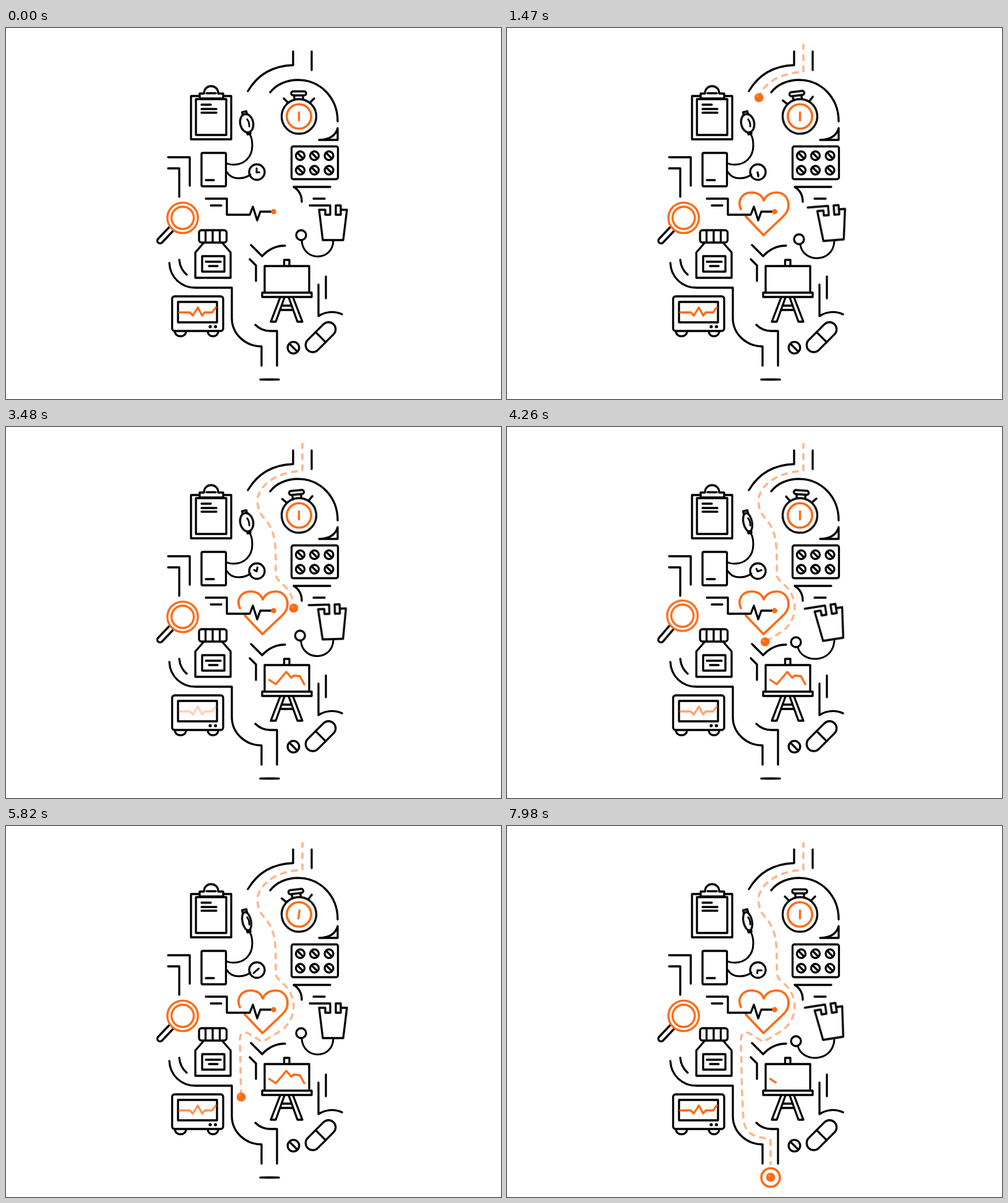
An HTML page without scripts that plays this animation: 800 px wide and 600 px high, repeating every 8000 ms.

```html
<!DOCTYPE html>
<html lang="en">
<head>
<meta charset="utf-8">
<title>Medical journey</title>
<style>
  @property --hours { syntax: "<number>"; inherits: true; initial-value: 0; }

  html, body { margin: 0; width: 100%; height: 100%; overflow: hidden; background: #fff; }
  svg {
    display: block; width: 800px; height: 600px;
    --orange: #ff6a13;
    --route: path("M479 26 V71 C450 72 416 84 407 113 C404 140 418 146 425 158 C434 172 436 190 436 217 V238 C437 250 448 252 456 264 C470 284 468 312 446 330 L418 347 L414 349 L396 338 C388 332 378 331 378 346 L380 438 L382 473 C384 494 394 500 408 503 L426 507 V568");
    fill: none; stroke: #000; stroke-width: 3.3; stroke-linecap: round; stroke-linejoin: round;
  }
  .white { fill: #fff; }
  .orange { stroke: var(--orange); }
  .dot { fill: var(--orange); stroke: none; }
  .move { animation: 8s linear infinite; }
  .ease { animation-timing-function: ease-in-out; }

  /* ball and the dashed trail behind it share one timeline */
  .route { d: var(--route); }
  .trail { stroke: #ffb68c; stroke-width: 3.6; stroke-dasharray: 8 10; }
  .reveal { stroke: #fff; stroke-width: 14; stroke-linecap: butt; stroke-dasharray: 100 200; animation-name: travel; }
  .ball { offset-path: var(--route); offset-rotate: 0deg; animation-name: travel, appear; }
  @keyframes travel {
    0%, 1.1% { offset-distance: 0%; stroke-dashoffset: 100; }
    18.375% { offset-distance: 18.8%; stroke-dashoffset: 81.2; }
    32.625% { offset-distance: 34.5%; stroke-dashoffset: 65.5; }
    53.25% { offset-distance: 57.4%; stroke-dashoffset: 42.6; }
    72.75% { offset-distance: 77.75%; stroke-dashoffset: 22.25; }
    87.75% { offset-distance: 93.94%; stroke-dashoffset: 6.06; }
    93.25%, 100% { offset-distance: 100%; stroke-dashoffset: 0; }
  }
  @keyframes appear { 0%, 1% { opacity: 0; } 1.5%, 100% { opacity: 1; } }

  .draw { stroke-dasharray: 100 200; stroke-dashoffset: 101; }
  .heart { animation-name: heart; }
  @keyframes heart {
    0%, 1.2% { stroke-dashoffset: 101; opacity: 0; }
    1.3% { stroke-dashoffset: 100; opacity: 1; }
    15%, 100% { stroke-dashoffset: 0; opacity: 1; }
  }
  .chart { animation-name: chart; }
  @keyframes chart {
    0%, 25% { stroke-dashoffset: 100; opacity: 0; }
    25.1% { stroke-dashoffset: 100; opacity: 1; }
    32.625% { stroke-dashoffset: 38; }
    37.5%, 91.5% { stroke-dashoffset: 0; }
    99.75%, 100% { stroke-dashoffset: 87; opacity: 1; }
  }

  .signal { animation-name: blink; }
  @keyframes blink {
    0%, 10.5%, 18.4%, 30.4%, 40.9%, 48.75%, 60.75%, 71.25%, 79.1%, 91.1%, 100% { opacity: 1; }
    14.4%, 44.8%, 75.2% { opacity: .1; }
    22.9%, 53.25%, 83.6% { opacity: .62; }
    27%, 57.4%, 87.75% { opacity: .22; }
  }

  .lens { transform-origin: 248px 346px; animation-name: search; }
  @keyframes search {
    0%, 18.4%, 40.6%, 51%, 70.9%, 81.3%, 91.2%, 100% { transform: rotate(0); }
    6.25%, 32.6%, 56.25%, 84.4% { transform: rotate(-7.5deg); }
    12.5%, 25%, 63%, 87.75% { transform: rotate(3.7deg); }
  }

  .watch, .hand { transform-origin: 473px 143px; }
  .watch { animation-name: shake; }
  @keyframes shake {
    0%, 32.6%, 91.2%, 100% { transform: rotate(0); }
    6%, 18.4%, 40%, 61%, 72.75% { transform: rotate(-7deg); }
    12%, 25%, 53.25%, 66%, 80% { transform: rotate(4deg); }
    87.75% { transform: rotate(-9deg); }
  }
  .hand { animation-name: tick; }
  @keyframes tick {
    0%, 18.4%, 32.6%, 53.25%, 91.2%, 100% { transform: rotate(0); }
    72.75% { transform: rotate(8deg); }
    87.75% { transform: rotate(-7deg); }
  }

  .bulb { transform-origin: 0 0; vector-effect: non-scaling-stroke; animation-name: squeeze; }
  @keyframes squeeze {
    0%, 9%, 18.4%, 43%, 63%, 87.75% { transform: scaleX(1); }
    4.5%, 13.5%, 32.6%, 53.25%, 72.75%, 99.75%, 100% { transform: scaleX(.66); }
  }

  .clock { animation-name: hours; }
  .clock path { transform-origin: 405px 233.5px; }
  .minute { transform: rotate(calc(var(--hours) * 360deg)); }
  .hour { transform: rotate(calc(90deg + var(--hours) * 30deg)); }
  @keyframes hours {
    0% { --hours: 0; }
    18.375% { --hours: 2.47; }
    32.625% { --hours: 5.73; }
    53.25% { --hours: 8.2; }
    72.75% { --hours: 10.63; }
    87.75% { --hours: 12; }
    99.75%, 100% { --hours: 15.25; }
  }

  .scope { transform-origin: 530px 352px; animation-name: tilt; }
  .bell { animation-name: swing; }
  .tube { animation-name: bend; }
  @keyframes tilt {
    0%, 23.1%, 40.6%, 68.75%, 90%, 100% { transform: rotate(0); }
    10.1%, 13.75%, 50.6%, 60%, 99.75% { transform: rotate(-9deg); }
  }
  @keyframes swing {
    0%, 23.1%, 40.6%, 68.75%, 90%, 100% { transform: translate(0, 0); }
    10.1%, 13.75%, 50.6%, 60%, 99.75% { transform: translate(-10px, 13px); }
  }
  @keyframes bend {
    0%, 23.1%, 40.6%, 68.75%, 90%, 100% { d: path("M478 344 C480 378 528 378 529 344"); }
    10.1%, 13.75%, 50.6%, 60%, 99.75% { d: path("M470 356 C476 382 526 384 529 346"); }
  }

  .goal { ry: .1px; stroke-width: 3.6; animation-name: open; }
  @keyframes open {
    0%, 80.3% { ry: .1px; stroke: #000; }
    85.5% { ry: 15px; stroke: #f9a070; }
    87.75% { ry: 15px; stroke: #fb9558; }
    93.5%, 100% { ry: 15px; stroke: #ff6a13; }
  }
</style>
</head>
<body>
<svg viewBox="0 0 800 600">
  <defs>
    <mask id="reveal" maskUnits="userSpaceOnUse" x="0" y="0" width="800" height="548">
      <path class="route reveal move" pathLength="100"/>
    </mask>
    <g id="pill"><circle r="7"/><path d="M-4.5 -4.5 L4.5 4.5"/></g>
    <g id="row"><use href="#pill" x="475.5"/><use href="#pill" x="498.5"/><use href="#pill" x="522"/></g>
  </defs>

  <!-- tunnel walls -->
  <path d="M464 38 V60 C431 61 407 75 391 102 M494 38 V68
    M427 104 C437 91 454 84 472 84 C508 84 536 113 536 151
    M506 181 H536 V162 C533 174 522 181 506 181
    M262 209 H297 V255 M262 227 H280 V273
    M465 257 H524 M465 257 C473 262 478 270 478 281 M497 276 H515
    M396 351 L414 369 C424 358 436 352 451 352 M394 374 L404 384 V409
    M264 380 C265 403 283 420 306 420 H365 V469 C365 495 387 515 413 515 V546
    M280 375 C281 385 285 393 292 399
    M403 480 C410 487 418 490 427 490 H438 V546
    M517 402 V437 M505 415 V466 C515 459 530 457 543 463"/>

  <!-- clipboard -->
  <path d="M299 110 H364 V180 H299 Z M307 115 H356 V173 H307 Z"/>
  <path class="white" d="M313 114 V106 H320 C320 90 343 90 343 106 H351 V114 Z"/>
  <path d="M324 105.5 H339 M316 124 H331 M316 131 H340 M316 137 H340"/>

  <!-- blood pressure meter -->
  <rect x="316" y="202" width="39.5" height="54" rx="2"/>
  <path d="M323 246 H336"/>
  <path stroke-width="3" d="M394 172 C398 178 398 184 398 190 C398 210 384 221 368 221 C362 221 359 220 357 219
    M357 233 C361 240 367 243 376 243 C384 243 390 241 395 237"/>
  <g transform="translate(389 154) rotate(-12)">
    <path class="white" d="M-3.5 -19 H3.5 V-13 H-3.5 Z M-2.5 14 H2.5 V18 H-2.5 Z"/>
    <ellipse class="white bulb move ease" rx="10.5" ry="15"/>
    <path stroke-width="2.8" d="M2 -6 C4 -2 4 2 3 6"/>
  </g>
  <circle cx="405.5" cy="233" r="12.5"/>
  <g class="clock move" stroke-width="3">
    <path class="minute" d="M405 233.5 V227"/>
    <path class="hour" d="M405 233.5 V229"/>
  </g>

  <!-- stopwatch -->
  <g class="watch move ease">
    <path d="M449 114 L456 121 M498 114 L491 121 M466 109 V115 M480 109 V115"/>
    <rect class="white" x="461" y="102.5" width="24" height="6.5" rx="3"/>
    <circle class="white" cx="473.5" cy="143" r="28"/>
  </g>
  <circle class="orange" cx="473.5" cy="143" r="19.7" stroke-width="3.6"/>
  <path class="orange hand move ease" d="M473.5 136.5 V149.5"/>

  <!-- blister pack -->
  <rect x="461.5" y="191.5" width="75" height="53" rx="3"/>
  <use href="#row" y="206.5"/>
  <use href="#row" y="230"/>

  <!-- stethoscope -->
  <path class="tube move ease" d="M478 344 C480 378 528 378 529 344" stroke-width="3"/>
  <circle class="bell white move ease" cx="477" cy="335" r="8"/>
  <path class="scope move ease" d="M491 287 H524 V302 H516 V294 H506 L512 343 H545 L551 294 H541 M533 287 H541 V302 H533 Z"/>

  <!-- magnifier -->
  <g class="lens move ease">
    <path stroke-width="12" d="M267 325 L249 344"/>
    <path stroke="#fff" stroke-width="5.4" d="M267 325 L249 344"/>
    <circle class="white orange" cx="285.5" cy="307" r="24.7"/>
    <circle class="orange" cx="285.5" cy="307" r="18"/>
  </g>

  <!-- heartbeat -->
  <path class="orange draw heart move ease" pathLength="100" stroke-width="3.6"
    d="M378 293 C371 277 382 266 395 266 C405 266 412 271 415 279 C418 271 426 266 436 266 C447 266 455 275 455 286 C455 296 450 301 445 306 L414.5 335 L386 305"/>
  <path d="M323 276 H357 V302 H394 L399 289 L406 311 L411 297 H430 M331 287 H348"/>
  <circle class="dot" cx="432.5" cy="297" r="4.3"/>

  <!-- medicine bottle -->
  <rect x="312" y="327" width="44.5" height="20" rx="4"/>
  <path d="M322.5 328 V346 M334 328 V346 M345.5 328 V346
    M319 348 L306 363 V404 H363 V363 L350 348
    M317 369 H353 V394 H317 Z M323 378 H347 M328 385 H342"/>

  <!-- monitor -->
  <rect x="268.5" y="434" width="82.5" height="56" rx="4"/>
  <path d="M278 443 H341 V476 H278 Z M273 491 C274 501 290 501 291 491 M326 491 C327 501 342 501 343 491"/>
  <path class="orange signal move ease" d="M280 460 H297 L302 465 L310 452 L317 465 L321 460 H333 L339 452"/>
  <circle cx="330" cy="483" r="2.6" fill="#000" stroke="none"/>
  <circle cx="338.5" cy="483" r="2.6" fill="#000" stroke="none"/>

  <!-- easel -->
  <path d="M418 385 H490 V428 H418 Z M414 428 H494 V435 H414 Z M449.5 384 V375 H458 V384
    M443 436 L428 475 H436 L450 436 M464 436 L479 475 H471 L457 436
    M447 449 H461 M444 456 H463"/>
  <path class="orange draw chart move" pathLength="100" d="M425.5 409 L436 416 L453 396 L461 405.5 L465 402 L475 403 L482 416"/>

  <!-- tablet and capsule -->
  <circle cx="464.5" cy="517" r="9.3"/>
  <path d="M459 511.5 L470 522.5"/>
  <g transform="translate(508.5 500) rotate(-45)">
    <rect x="-29.5" y="-11.5" width="59" height="23" rx="11.5"/>
    <path d="M0 -11.5 V11.5"/>
  </g>

  <!-- journey -->
  <g mask="url(#reveal)"><path class="route trail"/></g>
  <ellipse class="goal move" cx="426" cy="568.5" rx="15"/>
  <g class="ball move">
    <circle class="dot" r="7.3"/>
    <circle cx="-2.2" cy="-2.2" r="1.8" fill="#ff9a5c" stroke="none"/>
  </g>
</svg>
</body>
</html>
```
